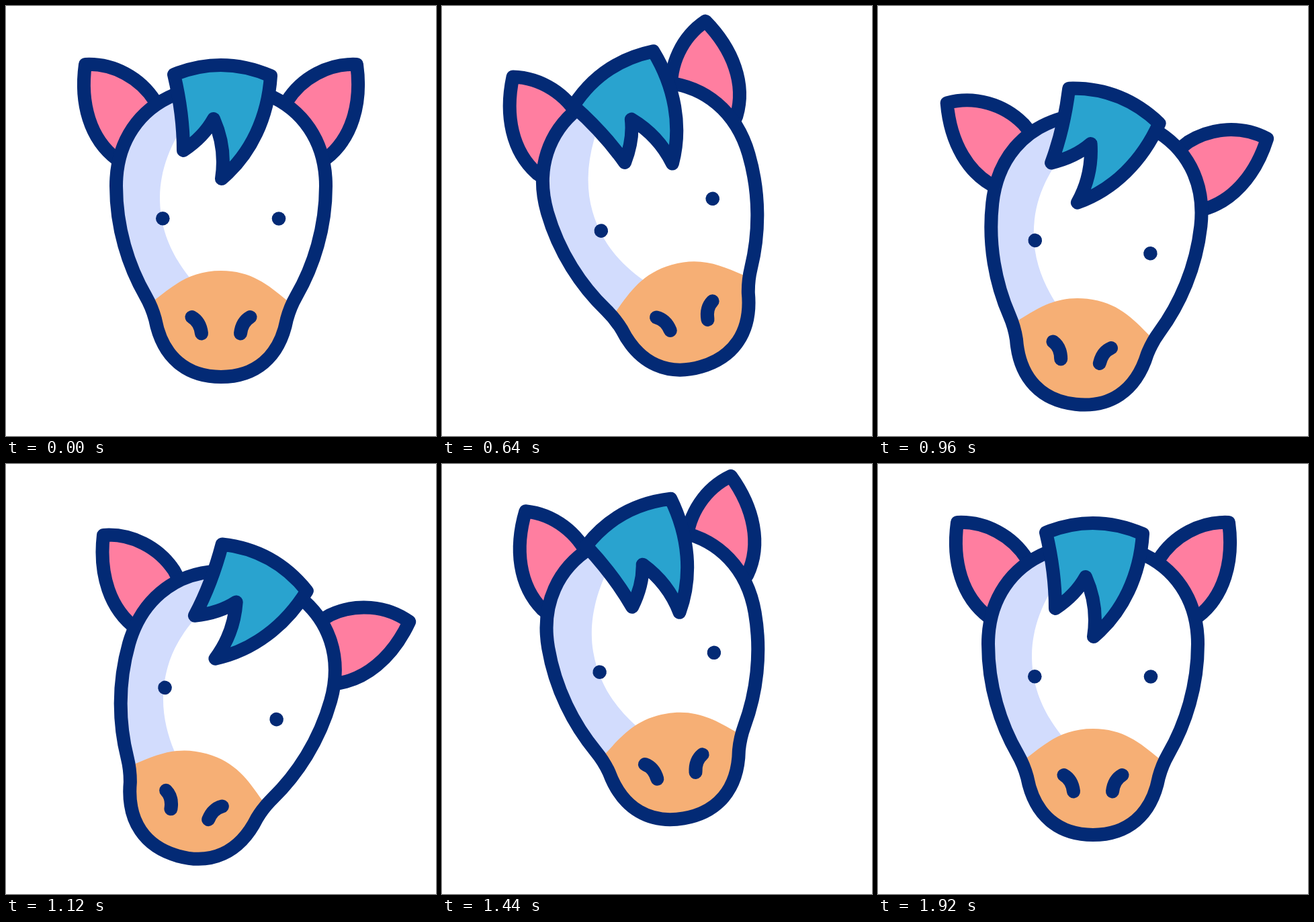
An HTML page for the animation above (2000 ms loop, 640 px wide and 640 px high).

```html
<!DOCTYPE html>
<html lang="en">
<head>
<meta charset="utf-8">
<title>Nodding horse</title>
<style>
  html, body { margin: 0; width: 100%; height: 100%; overflow: hidden; background: #fff; }
  svg { display: block; width: 100%; height: 100%; }
  .line { stroke: #032a75; stroke-width: 20; stroke-linecap: round; stroke-linejoin: round; }
  .open { fill: none; }
  .ear { fill: #ff7ea0; }
  .hair { fill: #29a3cf; }
  .eye { fill: #032a75; }
</style>
</head>
<body>
<svg viewBox="0 0 640 640">
  <defs>
    <path id="skull" d="M251 132 C200 153 164 200 164 268 C164 330 182 387 208 432
      C216 446 219 455 222 466 C233 524 270 552 320 552 C370 552 407 524 418 466
      C421 455 424 446 432 432 C458 387 476 330 476 268 C476 200 440 153 389 132
      C345 112 295 112 251 132 Z"/>
    <clipPath id="inside"><use href="#skull"/></clipPath>
    <path id="ear" d="M190 242 L165 228 C125 198 110 145 118 87 C160 85 200 107 222 142 L236 170 Z"/>
    <path id="nostril" d="M276.5 463 Q289 470 291 487.500"/>
  </defs>
  <g id="head">
    <g class="ear line">
      <use class="flap" href="#ear"/>
      <g transform="matrix(-1 0 0 1 640 0)"><use class="flap" href="#ear"/></g>
    </g>
    <use href="#skull" fill="#fff"/>
    <g clip-path="url(#inside)">
      <path fill="#d2dcfd" d="M300 135 C254 180 229 235 229 285 C229 335 248 372 273 404 L290 425 L200 470 H140 V110 Z"/>
      <path fill="#f6af75" d="M190 464 L222 437 C250 415 275 394 320 394 C365 394 390 415 418 438 L450 464 V570 H190 Z"/>
    </g>
    <use class="line open" href="#skull"/>
    <g class="line open">
      <use href="#nostril"/>
      <use href="#nostril" transform="matrix(-1 0 0 1 640 0)"/>
    </g>
    <circle class="eye" cx="233.300" cy="316.300" r="10.300"/>
    <circle class="eye" cx="406" cy="316.500" r="10.300"/>
    <path id="hair" class="hair line" d="M250 102 Q322 73 394 104 C390 165 365 220 321 257
      C326 225 321 195 309 168 C298 188 282 203 264 215 C264 180 259 140 250 102 Z"/>
  </g>
</svg>
<script>
  const LOOP = 2000, STEP = 40, LAST = 1920;

  // Each track is a list of [time in ms, value], eased by a sine between keys.
  const tracks = {
    lift: [[0, 0], [155, 0], [485, -17], [1042, 45.5], [1475, -22.3], [LAST, 0]],
    tilt: [[0, 0], [260, 0], [680, -16.5], [1120, 15.8], [1480, -10.5], [LAST, 0]],
    flap: [[0, 0], [520, 21], [615, 21], [945, -19], [1060, -19], [1475, 19], [LAST, 0]],
    sway: [[0, 0], [300, 0], [615, -19.5], [945, 14], [1060, 14], [1475, -20.8], [LAST, 0]]
  };

  const head = document.getElementById("head");
  const hair = document.getElementById("hair");
  const ears = document.querySelectorAll(".flap");

  function valueAt(keys, t) {
    const i = Math.max(1, keys.findIndex(k => k[0] >= t));
    const [t0, a] = keys[i - 1], [t1, b] = keys[i];
    return a + (b - a) * (1 - Math.cos(Math.PI * (t - t0) / (t1 - t0))) / 2;
  }

  function draw() {
    const now = performance.now() % LOOP;
    // The motion runs at 25 poses a second and rests on the last one.
    const t = Math.min(LAST, Math.floor(now / STEP) * STEP);
    const at = name => valueAt(tracks[name], t).toFixed(2);
    head.setAttribute("transform", `translate(0 ${at("lift")}) rotate(${at("tilt")} 320 316)`);
    hair.setAttribute("transform", `rotate(${at("sway")} 320 128)`);
    ears.forEach(ear => ear.setAttribute("transform", `rotate(${at("flap")} 220 220)`));
    requestAnimationFrame(draw);
  }
  draw();
</script>
</body>
</html>
```
